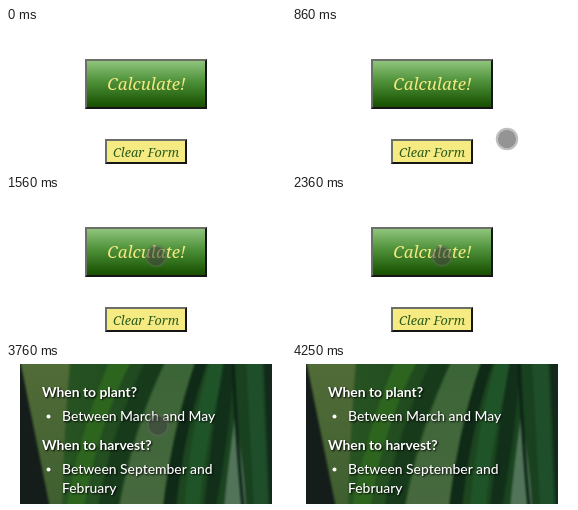
These frames come from a looping animation (280 by 140 pixels, 5510 ms). An HTML page:

```html
<!DOCTYPE html>
<html lang="en">
<head>
<meta charset="utf-8">
<title>Planting calculator</title>
<style>
  html, body { margin: 0; width: 100%; height: 100%; overflow: hidden; background: #fff; }
  svg { display: block; width: 100%; height: 100%; }
  .button { font-family: "Noto Serif", serif; font-style: italic; text-anchor: middle; }
  .info { font: 500 13.9px Lato, sans-serif; fill: #fff; text-shadow: 1px 1px 2px #000; }
  .bold { font-weight: 700; }
  .blur { filter: blur(1.2px); }
</style>
</head>
<body>
<svg viewBox="0 0 280 140">
  <defs>
    <linearGradient id="green" x2="0" y2="1">
      <stop stop-color="#8fc47c"/>
      <stop offset=".45" stop-color="#4d9038"/>
      <stop offset="1" stop-color="#164f00"/>
    </linearGradient>
    <linearGradient id="shade">
      <stop stop-color="#2c5a24"/>
      <stop offset=".45" stop-color="#204a1f"/>
      <stop offset="1" stop-color="#173f20"/>
    </linearGradient>
    <linearGradient id="olive" x2="0" y2="1">
      <stop stop-color="#526c38"/>
      <stop offset="1" stop-color="#3f5f30"/>
    </linearGradient>
    <linearGradient id="blade" x2="0" y2="1">
      <stop stop-color="#3b6536"/>
      <stop offset="1" stop-color="#48693f"/>
    </linearGradient>
    <clipPath id="photo"><rect x="14" width="252" height="140"/></clipPath>
  </defs>

  <g id="form">
    <rect x="79" y="31" width="122" height="50" fill="#161616"/>
    <path d="M79 81V31H201L199 33H81V79Z" fill="#6b6f68"/>
    <rect x="81" y="33" width="118" height="46" fill="url(#green)"/>
    <text class="button" x="140.5" y="62" font-size="16.8" fill="#f3e882">Calculate!</text>
    <rect x="99" y="111" width="82" height="25" fill="#161616"/>
    <path d="M99 136V111H181L179 113H101V134Z" fill="#6b6f68"/>
    <rect x="101" y="113" width="78" height="21" fill="#f6eb83"/>
    <text class="button" x="140" y="129" font-size="12.7" fill="#2c5c1c">Clear Form</text>
  </g>

  <g id="answer" visibility="hidden">
    <g clip-path="url(#photo)">
      <rect x="14" width="252" height="140" fill="url(#shade)"/>
      <g class="blur">
        <path d="M10 -4H64Q58 70 56 144H40Z" fill="url(#olive)"/>
        <path d="M10 -4H14L44 144H10Z" fill="#141d19"/>
        <path d="M104 -4H126Q92 60 78 144H60Q76 60 104 -4Z" fill="#2d651f"/>
        <path d="M140 -4H160Q124 66 112 144H92Q106 64 140 -4Z" fill="#173a1b"/>
        <path d="M160 -4H190Q166 66 157 144H113Q128 64 160 -4Z" fill="url(#blade)"/>
        <path d="M190 -4H202Q178 66 170 144H157Q166 66 190 -4Z" fill="#0f2a17"/>
        <path d="M204 -4H222Q200 66 194 144H178Q184 66 204 -4Z" fill="#1f5428"/>
        <path d="M218 -4H228Q226 50 210 144H198Q206 66 218 -4Z" fill="#112f19"/>
        <path d="M229 52Q238 100 240 144H218Q222 100 229 52Z" fill="#52755a"/>
        <path d="M227 -4Q230 70 237 144" fill="none" stroke="#0d2215" stroke-width="3"/>
        <path d="M240 -4H256L262 144H248Z" fill="#1f4f2a"/>
        <path d="M258 -4H270V144H264Z" fill="#12291b"/>
      </g>
    </g>
    <g class="info">
      <text class="bold" x="36" y="33">When to plant?</text>
      <circle cx="42.5" cy="52.5" r="2"/>
      <text x="56" y="57">Between March and May</text>
      <text class="bold" x="36" y="86">When to harvest?</text>
      <circle cx="42.5" cy="105.5" r="2"/>
      <text x="56" y="110">Between September and</text>
      <text x="56" y="129">February</text>
    </g>
  </g>

  <g id="pointer" visibility="hidden">
    <circle r="9.2" fill="#404040" fill-opacity=".56"/>
    <circle r="10.2" fill="none" stroke="#646464" stroke-opacity=".42" stroke-width="2"/>
  </g>
</svg>
<script>
  const LOOP = 5510, STEP = 70;
  const ENTER = 720, ARRIVE = 1560, PRESS = 2290, SWITCH = 2430, LEAVE = 3760, GONE = 4250;
  const [form, answer, pointer] = ["form", "answer", "pointer"].map(id => document.getElementById(id));
  const show = (el, on) => el.setAttribute("visibility", on ? "visible" : "hidden");
  const held = (t, start) => start + Math.floor((t - start) / STEP) * STEP;

  // Horizontal distance from the resting point.
  function distance(t) {
    if (t < ARRIVE) return 65 * ((ARRIVE - held(t, ENTER)) / 700) ** 2.1;
    if (t < LEAVE) return 0;
    return 98 * ((held(t, LEAVE) - LEAVE + STEP) / 490) ** 2;
  }

  function draw(now) {
    const t = now % LOOP;
    const d = distance(t);
    const size = t >= PRESS && t < SWITCH ? 0.95 : 1;
    show(form, t < SWITCH);
    show(answer, t >= SWITCH);
    show(pointer, t >= ENTER && t < GONE);
    pointer.setAttribute("transform", `translate(${150 + d} ${60 + 0.785 * d}) scale(${size})`);
  }

  const start = performance.now();
  function tick() {
    draw(performance.now() - start);
    requestAnimationFrame(tick);
  }
  tick();
</script>
</body>
</html>
```
